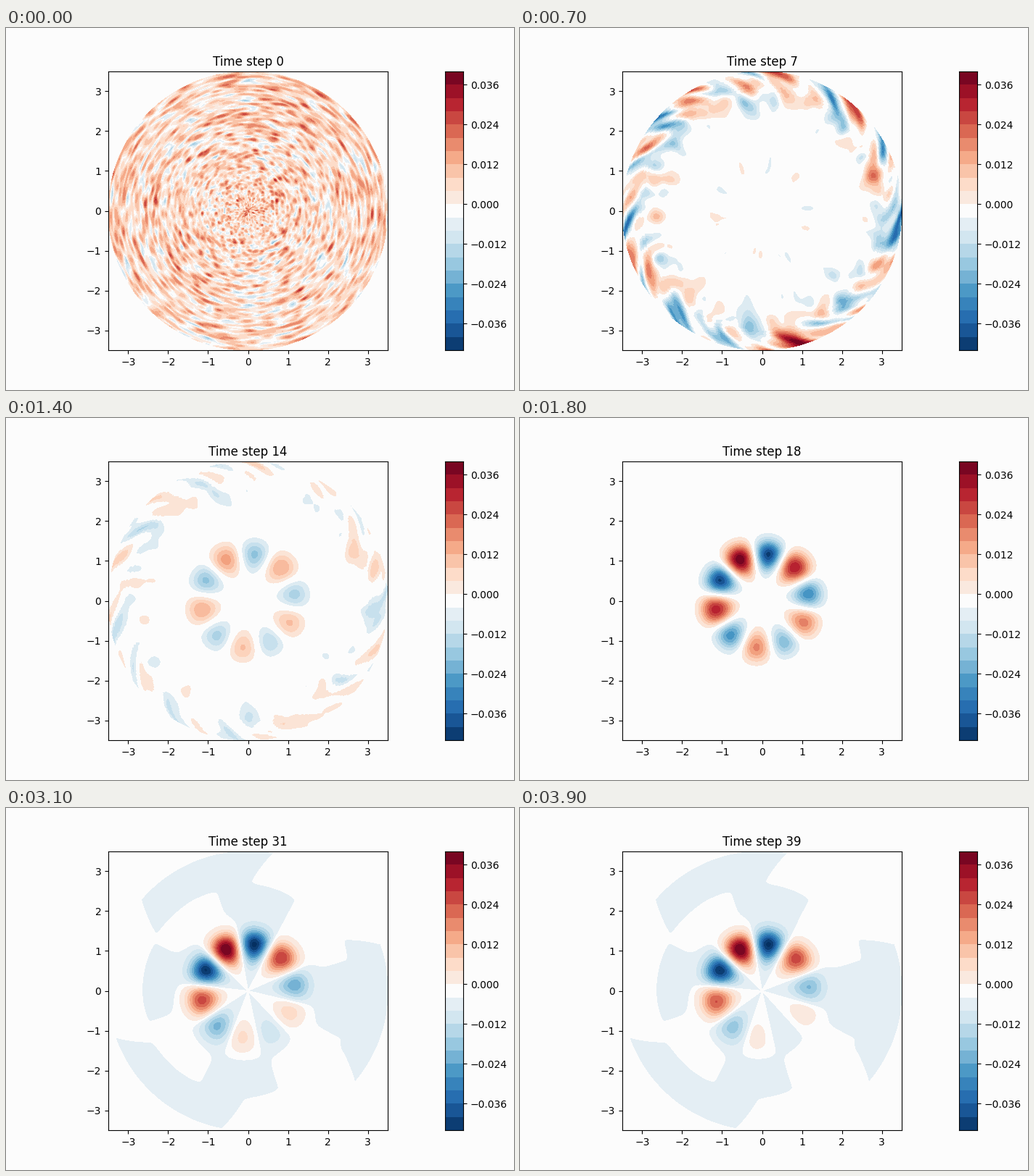
Animation of 700x500 px, one loop 4000 ms. Source, as a matplotlib script:

```python
import numpy as np
import matplotlib.pyplot as plt
from matplotlib.animation import FuncAnimation
from matplotlib.colors import ListedColormap

STEPS = 40
R_MAX = 3.5
NR, NT = 160, 360
BG = "#fcfcfc"

r = np.linspace(0, R_MAX, NR)[:, None]
deg = np.arange(NT)[None, :]
angle = np.radians(np.arange(NT + 1))
X = r * np.cos(angle)
Y = r * np.sin(angle)
levels = np.arange(-11, 12) * 0.004
cmap = plt.get_cmap("RdBu_r")


def bell(x, width):
    return np.exp(-0.5 * (x / width) ** 2)


def cosd(a):
    return np.cos(np.radians(a))


def sind(a):
    return np.sin(np.radians(a))


def smooth_step(x, width):
    return 0.5 + 0.5 * np.tanh(x / width)


def noise(seed, sr, st):
    """Unit-variance noise, blurred by sr and st cells along r and theta."""
    raw = np.random.default_rng(seed).normal(size=(NR, NT))
    fr = np.fft.fftfreq(NR)[:, None]
    ft = np.fft.fftfreq(NT)[None, :]
    blur = np.exp(-2 * np.pi**2 * ((sr * fr) ** 2 + (st * ft) ** 2))
    blur[0, 0] = 0
    z = np.fft.ifft2(np.fft.fft2(raw) * blur).real
    return z / z.std()


def tighten_centre(z):
    """Resample the rows so that the detail gets finer towards r = 0."""
    rows = np.sqrt(r / R_MAX) * (NR - 1.001)
    low = rows.astype(int)[:, 0]
    part = rows - low[:, None]
    return z[low] * (1 - part) + z[low + 1] * part


def shear(z):
    """Sweep the pattern sideways close to the rim."""
    turn = 12 * np.clip((r[:, 0] - 2.8) / 0.7, 0, 1) ** 2
    return np.stack([np.roll(row, int(t)) for row, t in zip(z, turn)])


start = 0.0027 + 0.0015 * (r / R_MAX) ** 3 + 0.0072 * noise(3, 0.9, 2.1)
early = (0.0012 * tighten_centre(noise(8, 4, 1.9))
         + 0.017 * bell(r - 3.45, 0.33) * shear(noise(5, 7, 2.3)))
middle = 0.015 * bell(r - 3.35, 0.6) * shear(noise(12, 7, 2.7))


def turbulence(s):
    """Rim waves that swell, change over into wider ones and die away."""
    strength = np.clip(min(s / 4, (16 - s) / 6), 0, 1)
    mix = np.pi / 2 * np.clip((s - 4) / 6, 0, 1)
    return strength * (np.cos(mix) * np.roll(early, s - 4, axis=1)
                       + np.sin(mix) * np.roll(middle, s - 10, axis=1))


def ring(s):
    """Five pairs of lobes; those below right weaken and drift apart."""
    rel = deg - 115
    skew = 22 * (1 - np.exp(-max(s - 10, 0) / 10))
    height = (43.5 - skew + skew * cosd(rel)) / 1000
    drift = 4 + 9 * max((s - 18) / 21, 0) ** 1.5
    base = deg - drift * sind(rel) * (1 - cosd(rel)) / 2
    return height * cosd(5 * (base - 118))


def arms(around):
    """Faint sign pattern: lobe sectors, then four arms, then three."""
    inner = around / 0.02
    four = -cosd(4 * (deg - 85))
    three = -cosd(3 * (deg - 119 + 11 * (r - 2.65)))
    z = inner + (four - inner) * smooth_step(r - 1.8, 0.15)
    z = z + (three - z) * smooth_step(r - 2.65, 0.05)
    return np.clip(0.01 * z, -0.0015, 0.0015)


def field(s):
    around = ring(s)
    radial = bell(r - 1.18, np.where(r > 1.18, 0.25, 0.29))
    growth = min(1, np.exp((s - 18) / 4.5))
    z = start * np.exp(-1.3 * s) + growth * radial * around + turbulence(s)
    if s >= 27:
        z += arms(around)
    z = np.clip(z, -0.0439, 0.0439)
    return np.hstack([z, z[:, :1]])


def band_colors(edges, centre):
    """Diverging colours around centre, with the middle left blank."""
    offset = (edges[:-1] + edges[1:]) / 2 - centre
    half = 0.044 if centre == 0 else 0.042
    return [BG if abs(v) < 0.003 else cmap(0.5 + v / (2 * half))
            for v in offset]


fig = plt.figure(figsize=(7, 5), dpi=100, facecolor=BG)
ax = fig.add_axes([141 / 700, 0.11, 385 / 700, 0.77], facecolor=BG)
ax.set_xticks(range(-3, 4))
ax.set_yticks(range(-3, 4))

bar = fig.add_axes([605 / 700, 0.11, 25.3 / 700, 0.77])
edges = levels[:-1]
bar.pcolormesh([0, 1], edges, np.arange(21)[:, None],
               cmap=ListedColormap(band_colors(edges, -0.002)))
bar.set_xticks([])
bar.yaxis.tick_right()
bar.set_yticks(np.arange(-3, 4) * 0.012)
bar.set_ylim(-0.044, 0.04)


def draw(s):
    for c in list(ax.collections):
        c.remove()
    centre = -0.002 if s < 7 else 0 if s < 27 else 0.002
    ax.contourf(X, Y, field(s), levels=levels,
                colors=band_colors(levels, centre))
    ax.set_xlim(-3.4995, 3.4995)
    ax.set_ylim(-3.4995, 3.4995)
    ax.set_title(f"Time step {s}")
    return []


anim = FuncAnimation(fig, draw, frames=STEPS, interval=100,
                     init_func=lambda: [], repeat=True, repeat_delay=0)
plt.show()
```
